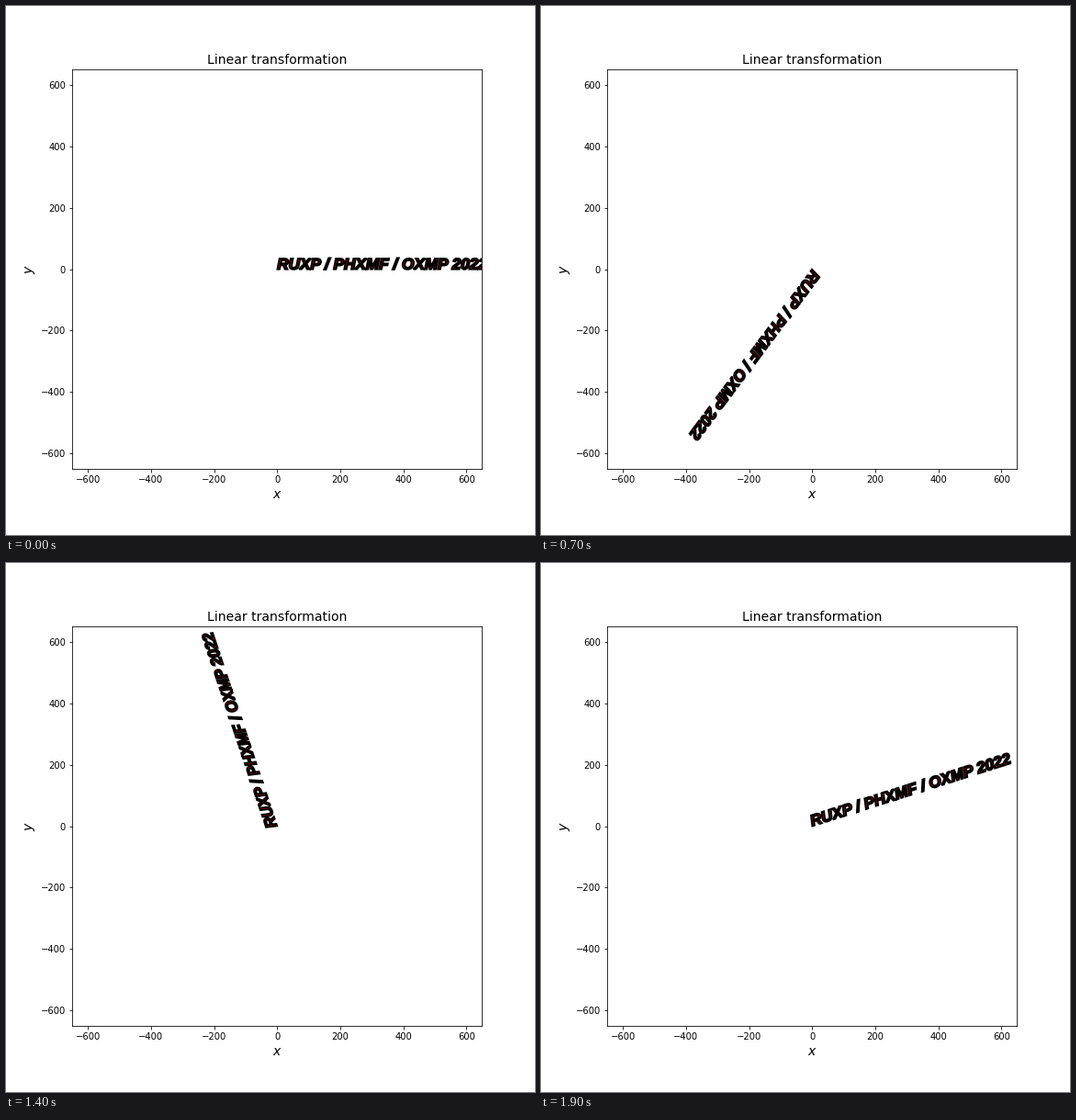
A matplotlib script for the animation above (2000 ms loop, 576 by 576 pixels).

```python
import matplotlib.pyplot as plt
from matplotlib.animation import FuncAnimation
from matplotlib.patches import PathPatch
from matplotlib.textpath import TextPath
from matplotlib.transforms import Affine2D

FRAMES = 20
INTERVAL = 100
LIMIT = 650

plt.rcParams.update({"font.family": "DejaVu Sans", "font.size": 10})

fig = plt.figure(figsize=(8, 8), dpi=72, facecolor="white")
fig.subplots_adjust(left=0.125, right=0.9, bottom=0.125, top=0.88)
ax = fig.add_subplot()
ax.set_xlim(-LIMIT, LIMIT)
ax.set_ylim(-LIMIT, LIMIT)
ax.set_title("Linear transformation", fontsize=14)
ax.set_xlabel("$x$", fontsize=14)
ax.set_ylabel("$y$", fontsize=14)

font = {"family": "Liberation Sans", "weight": "bold", "style": "italic"}
path = TextPath((0, 0), "RUXP / PHXMF / OXMP 2022", size=50, prop=font)
banner = PathPatch(path, facecolor="red", edgecolor="black", lw=2)
ax.add_patch(banner)


def update(i):
    """Turn the banner clockwise about the origin, in data coordinates."""
    turn = Affine2D().rotate_deg(-360 * i / FRAMES)
    banner.set_transform(turn + ax.transData)
    return (banner,)


anim = FuncAnimation(fig, update, frames=FRAMES, interval=INTERVAL,
                     init_func=lambda: update(0), repeat=True, repeat_delay=0)
plt.show()
```
